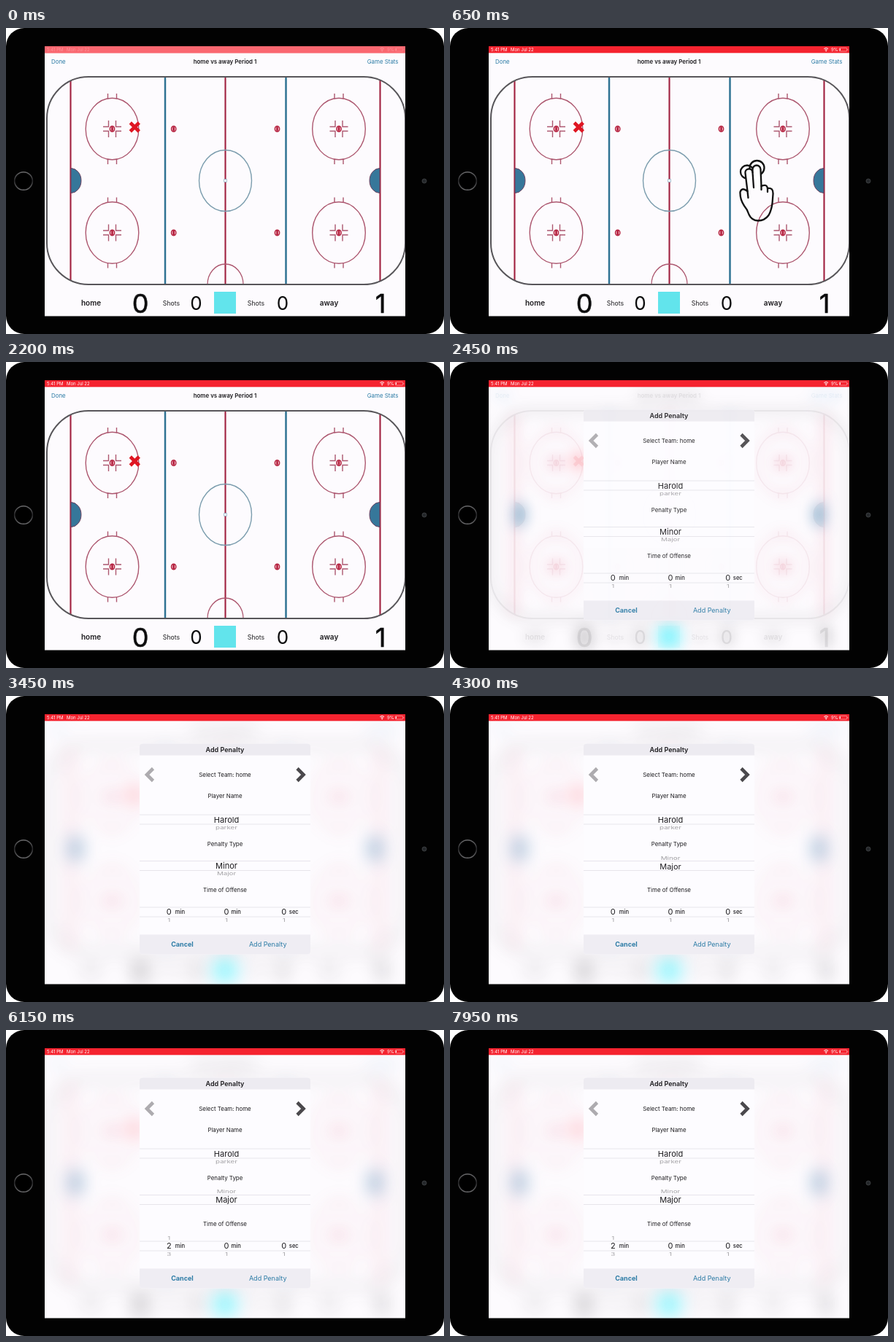
An HTML page that plays this animation: 600 px wide and 420 px high, repeating every 8 s.

```html
<!DOCTYPE html>
<html lang="en">
<head>
<meta charset="utf-8">
<title>Penalty entry</title>
<style>
  html, body { margin: 0; width: 100%; height: 100%; overflow: hidden; background: #fff; }
  svg { display: block; width: 600px; height: 420px; }
  text { font-family: Inter, Roboto, "Liberation Sans", sans-serif; fill: #1c1b1e; }
  .mid { text-anchor: middle; }
  .bold { font-weight: 600; }
  .link { fill: #2b7ba5; }
  .s8 { font-size: 7.9px; }
  .s9 { font-size: 9px; }
  .s10 { font-size: 10px; }
  .s26 { font-size: 26px; fill: #0c0c0d; }
  .s36 { font-size: 36px; fill: #0c0c0d; stroke: #0c0c0d; stroke-width: .5; }
  .status text { font-size: 6px; fill: #fff; }
  .red { stroke: #a0203f; fill: none; }
  .faded { stroke: #ad5870; fill: none; }
  .blue { stroke: #2f7393; fill: none; }
</style>
</head>
<body>
<svg viewBox="0 0 600 420">
  <defs>
    <linearGradient id="ring" x2="0" y2="1">
      <stop stop-color="#6a6a6c"/>
      <stop offset=".5" stop-color="#28282a"/>
      <stop offset="1" stop-color="#6a6a6c"/>
    </linearGradient>
    <clipPath id="screen"><rect x="53" y="25" width="494" height="370.5"/></clipPath>
    <clipPath id="ice"><rect x="56" y="67" width="491" height="285" rx="57"/></clipPath>
    <g id="dot">
      <ellipse rx="3.2" ry="3.8" fill="#f0c3cc" stroke="#b5213f" stroke-width="1.4"/>
      <path d="M0-3V3" stroke="#b5213f" stroke-width="2.6"/>
    </g>
    <g id="spot">
      <g class="faded" stroke-width="1.4">
        <ellipse rx="36.3" ry="42.2"/>
        <path d="M-6-48.5V-41M6-48.5V-41M-6 41V48.5M6 41V48.5"/>
        <path d="M-12.500-3H-5V-11.5M12.500-3H5V-11.5M-12.500 3H-5V11.5M12.500 3H5V11.5"/>
      </g>
      <use href="#dot"/>
    </g>
    <g id="game">
      <g clip-path="url(#ice)">
        <path class="red" stroke-width="2.1" d="M88.5 67V352M300.5 67V352M512.5 67V352"/>
        <path class="blue" stroke-width="2.5" d="M218 67V352M383.5 67V352"/>
        <ellipse class="faded" cx="300.5" cy="352" rx="24.5" ry="28" stroke-width="1.3"/>
      </g>
      <ellipse cx="300.5" cy="209.5" rx="36" ry="42" fill="none" stroke="#7c9dae" stroke-width="1.4"/>
      <rect x="298.7" y="207.7" width="3.6" height="3.6" fill="#fff" stroke="#7ea6bd" stroke-width=".7"/>
      <path d="M89 192.5a14 17 0 0 1 0 34z M512 192.5a14 17 0 0 0 0 34z" fill="#36779a" stroke="#6c4260" stroke-width="1"/>
      <g id="spots"></g>
      <rect x="56" y="67" width="491" height="285" rx="57" fill="none" stroke="#58565a" stroke-width="2"/>
      <path d="M170.3 130l12 12M182.3 130l-12 12" stroke="#df1522" stroke-width="4.7"/>
      <text class="s8 link" x="62" y="49">Done</text>
      <text class="s8 bold mid" x="300" y="49">home vs away Period 1</text>
      <text class="s8 link" x="537.5" y="49" text-anchor="end">Game Stats</text>
      <text class="s10 bold mid" x="116.5" y="381">home</text>
      <text class="s36 mid" x="184" y="390.5">0</text>
      <text class="mid" font-size="8.7" x="226.5" y="380.5">Shots</text>
      <text class="s26 mid" x="260.5" y="387">0</text>
      <rect x="285" y="362" width="30" height="30" fill="#62e4ec"/>
      <text class="mid" font-size="8.7" x="342.5" y="380.5">Shots</text>
      <text class="s26 mid" x="379" y="387">0</text>
      <text class="s10 bold mid" x="442.5" y="381">away</text>
      <text class="s36 mid" x="513" y="390.5">1</text>
    </g>
  </defs>

  <rect width="600" height="420" rx="25" fill="#020202"/>
  <circle cx="24" cy="210" r="12.3" fill="#000" stroke="url(#ring)" stroke-width="1.6"/>
  <circle cx="573" cy="210" r="3" fill="#25282b" stroke="#44474a" stroke-width=".8"/>

  <g clip-path="url(#screen)">
    <rect x="52" y="24" width="496" height="372" fill="#fdfbfe"/>
    <use id="sharp" href="#game"/>
    <use id="soft" href="#game"/>

    <g id="hand" fill="none" stroke="#111" stroke-width="2.3" stroke-linejoin="round" stroke-linecap="round">
      <circle cx="407" cy="197.5" r="9"/>
      <circle cx="420.5" cy="192" r="10"/>
      <path fill="#fff" stroke="none" d="M408 222L405 199a5 5 0 0 1 9.5-2V194a5.5 5.500 0 0 1 11 0L426.500 217V222Z"/>
      <path d="M407.500 224L404.500 199a5 5 0 0 1 10-1V194a5.500 5.500 0 0 1 11 0L426.500 217Q434 213.500 435 220Q443 218.500 442.500 228L441.500 241Q440 251 436.500 257Q431 264.500 422 264.500Q413 264 409.500 256Q408 250 403 244Q397 235 397.500 225Q400 218 407.500 224Z"/>
      <path d="M414.500 198L416 219M426.500 217V222M435 220V225M407.500 224L408.500 233"/>
    </g>

    <g id="panel">
      <rect x="183" y="65.5" width="234" height="289" rx="4" fill="#fdfcff"/>
      <path d="M183 81.500V69.500a4 4 0 0 1 4-4H413a4 4 0 0 1 4 4V81.500z" fill="#edebf1"/>
      <path d="M183 327.500H417V350.500a4 4 0 0 1-4 4H187a4 4 0 0 1-4-4z" fill="#efedf3"/>
      <path d="M183 163H417M183 176H417M183 226.500H417M183 239.500H417M183 290H417M183 303H417" stroke="#e5e3e9" stroke-width=".9"/>
      <text class="s9 bold mid" x="300" y="77">Add Penalty</text>
      <path d="M201.500 99.500L193 108L201.500 116.500" fill="none" stroke="#adabaf" stroke-width="4.6"/>
      <path d="M399 99.500L407.500 108L399 116.500" fill="none" stroke="#4b494d" stroke-width="4.6"/>
      <text class="s8 mid" x="300" y="110.800">Select Team: home</text>
      <text class="s8 mid" x="300" y="139.500">Player Name</text>
      <text class="s8 mid" x="300" y="205.500">Penalty Type</text>
      <text class="s8 mid" x="300" y="269">Time of Offense</text>
      <g id="wheels"></g>
      <g font-size="7.6" font-weight="500">
        <text x="231.8" y="299">min</text>
        <text x="308.5" y="299">min</text>
        <text x="387.8" y="299">sec</text>
      </g>
      <text class="s9 link mid" font-weight="700" x="241.5" y="344.3">Cancel</text>
      <text class="s9 link mid" x="358.7" y="344.3">Add Penalty</text>
    </g>

    <rect x="52" y="24" width="496" height="10.3" fill="#f5232f"/>
    <g class="status">
      <text x="56" y="31.8">5:41 PM</text>
      <text x="83" y="31.8">Mon Jul 22</text>
      <path d="M512.300 28.500Q515.200 26 518.100 28.500M513.600 30Q515.200 28.700 516.800 30" fill="none" stroke="#fff" stroke-width="1"/>
      <circle cx="515.2" cy="31.4" r=".8" fill="#fff"/>
      <text x="522" y="31.8">9%</text>
      <rect x="533.3" y="27.3" width="10.4" height="4.7" rx="1.2" fill="none" stroke="#fff" stroke-opacity=".7" stroke-width=".6"/>
      <path d="M534.400 28.200V31.100" stroke="#fff"/>
      <path d="M544.800 28.900V30.500" stroke="#fff" stroke-width=".7" stroke-opacity=".7"/>
    </g>
    <rect id="veil" x="52" y="24" width="496" height="10.3" fill="#fc7980"/>
  </g>
</svg>
<script>
  const NS = 'http://www.w3.org/2000/svg';
  const LOOP = 8000;
  const $ = id => document.getElementById(id);

  function add(parent, tag, attrs, label = '') {
    const el = document.createElementNS(NS, tag);
    for (const key in attrs) el.setAttribute(key, attrs[key]);
    el.textContent = label;
    parent.appendChild(el);
    return el;
  }

  for (const y of [138.5, 281]) {
    for (const [x, ref] of [[145.5, '#spot'], [229.7, '#dot'], [371.5, '#dot'], [456, '#spot']]) {
      add($('spots'), 'use', { href: ref, x, y });
    }
  }

  // A picker wheel: rows sit on a drum and flatten away from the middle.
  function wheel(x, y, labels) {
    const rows = labels.map(label =>
      add($('wheels'), 'text', { class: 'mid', 'font-size': 11, y: 4 }, label));
    return pos => rows.forEach((row, i) => {
      const d = i - pos, far = Math.abs(d);
      row.style.display = far < 1.4 ? '' : 'none';
      const angle = d * 0.88;
      const size = 1 - 0.11 * Math.min(far, 1);
      row.setAttribute('transform',
        `translate(${x} ${y + 14.3 * Math.sin(angle)}) scale(${size} ${size * Math.cos(angle)})`);
      row.setAttribute('opacity', Math.max(0, far < 1 ? 1 - 0.6 * far : 1.4 - far));
    });
  }

  const digits = ['0', '1', '2', '3', '4'];
  const player = wheel(302, 169.5, ['Harold', 'parker']);
  const type = wheel(302, 233, ['Minor', 'Major']);
  const period = wheel(223.3, 296.3, digits);
  const minute = wheel(302, 296.3, digits);
  const second = wheel(380.7, 296.3, digits);
  [player, minute, second].forEach(set => set(0));

  const ramp = (t, from, to) => Math.min(1, Math.max(0, (t - from) / (to - from)));
  const smooth = p => p * p * (3 - 2 * p);
  const easeOut = p => 1 - (1 - p) ** 2;

  function draw(t) {
    $('veil').style.opacity = 0.8 * (1 - ramp(t, 0, 350));
    $('hand').style.opacity = ramp(t, 350, 500) - ramp(t, 1350, 1500);

    const blur = easeOut(ramp(t, 2250, 2600));
    $('sharp').style.opacity = (1 - ramp(t, 2250, 2560)) ** 2.4;
    $('soft').style.display = blur ? '' : 'none';
    $('soft').style.opacity = 0.55 * ramp(t, 2250, 2400);
    $('soft').style.filter = `blur(${(12 * blur).toFixed(2)}px) saturate(1.5)`;
    $('panel').style.opacity = easeOut(ramp(t, 2250, 2520));

    type(smooth(ramp(t, 3600, 4400)));
    period(2 * smooth(ramp(t, 5000, 5900)));
  }

  const start = performance.now();
  function tick() {
    draw((performance.now() - start) % LOOP);
    requestAnimationFrame(tick);
  }
  tick();
</script>
</body>
</html>
```
